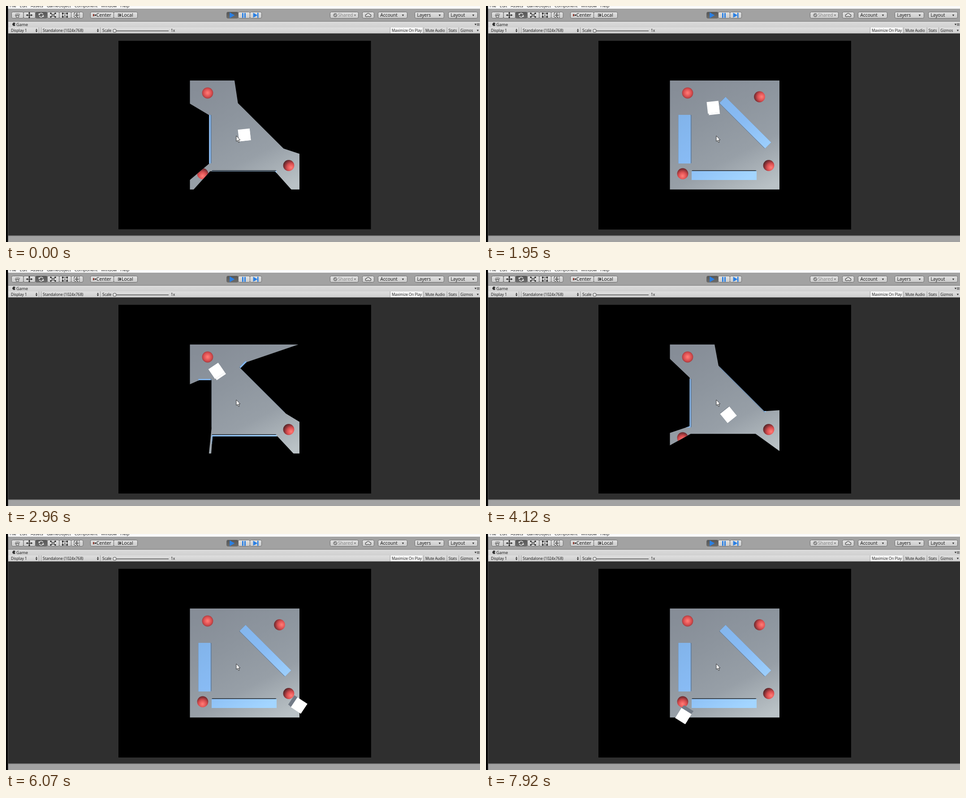
Recreate the animation shown at these times as an HTML page with a canvas. Size 1058x529 px, loop 7.99 s.

```html
<!DOCTYPE html>
<html lang="en">
<head>
<meta charset="utf-8">
<title>Line of sight</title>
<style>
html, body { margin: 0; width: 100%; height: 100%; overflow: hidden; background: #000; }
canvas { display: block; }
</style>
</head>
<body>
<canvas id="stage" width="1058" height="529"></canvas>
<script>
const ctx = document.getElementById('stage').getContext('2d');
const LOOP = 7990, STEP = 78, PUSH = 3.5;
const CENTER = { x: 533, y: 289 }, AIM = { x: 514, y: 291 };

// The cube's route as waypoints [time, x, y], with rests in between
const ROUTE = [
  [230, 532, 289], [1950, 507, 227], [2960, 470, 226], [4120, 541, 324.5], [5130, 619.5, 331.5],
  [5830, 656, 361], [6370, 652, 415], [6840, 578.5, 413], [7920, 440.5, 408]
];
const RESTS = [[620, 940], [2490, 2720], [4730, 4960]];
const REVEALED = [[1600, 2450], [5500, 6690], [7700, LOOP]];

const WALLS = [box(443, 298.5, 27.5, 109, 0), box(531.5, 380, 145, 19.8, 0), box(578.8, 261.5, 144, 19, Math.PI / 4)];
const BALLS = [[450, 195], [610.5, 203.5], [631, 357.5], [439, 376]];
const edges = [...WALLS, box(CENTER.x, CENTER.y, 1800, 1800, 0)].flatMap(sides);

function box(cx, cy, w, h, angle) {
  const c = Math.cos(angle), s = Math.sin(angle);
  return [[-1, -1], [1, -1], [1, 1], [-1, 1]].map(([i, j]) => {
    const u = i * w / 2, v = j * h / 2;
    return { x: cx + u * c - v * s, y: cy + u * s + v * c };
  });
}
function sides(points) {
  return points.map((p, i) => [p, points[(i + 1) % points.length]]);
}
function toCenter(p, scale) {
  return { x: CENTER.x + (p.x - CENTER.x) * scale, y: CENTER.y + (p.y - CENTER.y) * scale };
}

function gradient(g, ...colors) {
  colors.forEach((c, i) => g.addColorStop(i / (colors.length - 1), c));
  return g;
}
function linear(x0, y0, x1, y1, ...colors) {
  return gradient(ctx.createLinearGradient(x0, y0, x1, y1), ...colors);
}
function rect(x, y, w, h, fill) {
  ctx.fillStyle = fill;
  ctx.fillRect(x, y, w, h);
}
function frameRect(x, y, w, h, color = '#222') {
  ctx.strokeStyle = color;
  ctx.lineWidth = 1;
  ctx.strokeRect(x, y, w, h);
}
function trace(points) {
  ctx.beginPath();
  points.forEach(p => ctx.lineTo(p.x, p.y));
  ctx.closePath();
}
function poly(points, fill) {
  trace(points);
  ctx.fillStyle = fill;
  ctx.fill();
}
function disc(x, y, r, fill) {
  ctx.beginPath();
  ctx.arc(x, y, r, 0, 7);
  ctx.fillStyle = fill;
  ctx.fill();
}
function line(x0, y0, x1, y1, color = '#222', width = 1.2) {
  ctx.beginPath();
  ctx.moveTo(x0, y0);
  ctx.lineTo(x1, y1);
  ctx.strokeStyle = color;
  ctx.lineWidth = width;
  ctx.stroke();
}
function arrow(x, y, angle, size, fill = '#333') {
  const at = (a, r) => ({ x: x + r * Math.cos(angle + a), y: y + r * Math.sin(angle + a) });
  poly([at(0, size), at(2.1, size), at(-2.1, size)], fill);
}
const caret = (x, y, fill) => arrow(x, y, Math.PI / 2, 2.6, fill);

function text(s, x, y, size, color = '#111') {
  ctx.font = `${size}px "Open Sans", sans-serif`;
  ctx.fillStyle = color;
  ctx.fillText(s, x, y);
  return ctx.measureText(s).width;
}
function button(x, w, dark) {
  ctx.beginPath();
  ctx.roundRect(x + .5, 13.5, w, 14, 3);
  ctx.fillStyle = dark ? linear(0, 13, 0, 28, '#555', '#6e6e6e') : linear(0, 13, 0, 28, '#e2e2e2', '#c9c9c9');
  ctx.fill();
  ctx.strokeStyle = '#6a6a6a';
  ctx.lineWidth = 1;
  ctx.stroke();
}

function handIcon(x, y) {
  for (let i = 0; i < 4; i++) line(x - 3 + i * 2.3, y + 1, x - 4 + i * 3, y - 5 + Math.abs(i - 1.5), '#555', 1);
  line(x - 3, y + 3, x - 5.5, y - .5, '#555', 1);
  frameRect(x - 3, y + 1, 6, 4, '#555');
}
function moveIcon(x, y) {
  for (let a = 0; a < 6; a += Math.PI / 2) {
    const dx = Math.cos(a), dy = Math.sin(a);
    line(x, y, x + dx * 5, y + dy * 5, '#222', 1.5);
    arrow(x + dx * 5, y + dy * 5, a, 2.6, '#222');
  }
}
function rotateIcon(x, y) {
  for (const a of [.4, .4 + Math.PI]) {
    ctx.beginPath();
    ctx.arc(x, y, 4.5, a, a + 2.3);
    ctx.strokeStyle = '#eee';
    ctx.lineWidth = 1.5;
    ctx.stroke();
    arrow(x + 4.8 * Math.cos(a), y + 4.8 * Math.sin(a), a - 1.6, 2.6, '#eee');
  }
}
function cornersIcon(x, y) {
  for (const i of [-1, 1]) for (const j of [-1, 1]) rect(x + i * 5 - 1.5, y + j * 4 - 1.5, 3, 3, '#222');
}
function scaleIcon(x, y) {
  line(x - 5, y - 4, x + 5, y + 4);
  line(x + 5, y - 4, x - 5, y + 4);
  cornersIcon(x, y);
  rect(x - 2, y - 2, 4, 4, '#ddd');
  frameRect(x - 2, y - 2, 4, 4);
}
function rectIcon(x, y) {
  frameRect(x - 5, y - 4, 10, 8);
  cornersIcon(x, y);
  disc(x, y, 1.2, '#222');
}
function transformIcon(x, y) {
  ctx.setLineDash([3, 2]);
  frameRect(x - 6, y - 5, 12, 10);
  ctx.setLineDash([]);
  ctx.save();
  ctx.translate(x, y);
  ctx.scale(.6, .6);
  moveIcon(0, 0);
  ctx.restore();
}

function drawToolbar() {
  [handIcon, moveIcon, rotateIcon, scaleIcon, rectIcon, transformIcon].forEach((icon, i) => {
    button(12 + i * 26.6, 26.6, icon === rotateIcon);
    icon(25.5 + i * 26.5, 20.5);
  });

  button(188, 52);
  button(240, 53);
  rect(194, 18, 3, 5, '#913f35');
  rect(198, 19, 3, 3, '#333');
  text('Center', 201.5, 24.3, 10.7);
  frameRect(250.5, 17.5, 5, 6, '#444');
  rect(252, 19, 5, 3, '#444');
  text('Local', 258, 24.3, 10.7);

  const blue = '#2a7fe2';
  for (let i = 0; i < 3; i++) button(492 + i * 26, 26, i === 0);
  arrow(503, 20.7, 0, 7.5, blue);
  rect(527, 15.5, 3, 11, blue);
  rect(532, 15.5, 3, 11, blue);
  arrow(555, 20.7, 0, 6.5, blue);
  rect(561, 15, 2.5, 11.5, blue);

  button(723, 63);
  disc(735, 20.5, 4.5, '#858585');
  line(733, 20.5, 734.5, 22, '#ddd');
  line(734.5, 22, 737.5, 18.5, '#ddd');
  text('Shared', 741, 24, 10.2, '#858585');
  caret(779, 20.5, '#777');

  button(795, 26);
  for (const [grow, fill] of [[1, '#333'], [0, '#d8d8d8']]) {
    for (const i of [-1, 0, 1]) disc(808.5 + i * 3.5, 21.5 - (i ? 0 : 1.5), 2.2 + (i ? 0 : 1) + grow, fill);
  }
  for (const [label, x] of [['Account', 830], ['Layers', 912], ['Layout', 987]]) {
    button(x, 65);
    text(label, x + 5.5, 24.3, 10.2);
    caret(x + 56, 20.5);
  }
}

function drawTabs() {
  rect(5, 34, 1053, 14, linear(0, 34, 0, 48, '#dcdcdc', '#d0d0d0'));
  rect(5, 34, 1053, 1, '#777');
  ctx.beginPath();
  ctx.moveTo(19, 41);
  ctx.arc(18, 41, 3.7, .6, 5.7);
  ctx.fillStyle = '#333';
  ctx.fill();
  text('Game', 23, 44.6, 9.4);
  caret(1048, 41);
  for (let y = 39.5; y < 45; y += 2) line(1051, y, 1057, y, '#444', 1);

  rect(5, 48, 1053, 14, linear(0, 48, 0, 62, '#dedede', '#cecece'));
  const label = (s, x) => text(s, x, 57.8, 8.5);
  label('Display 1', 11);
  label('Standalone (1024x768)', 82);
  label('Scale', 215);
  label('1x', 368);
  for (const x of [68, 205]) {
    caret(x, 56.3);
    arrow(x, 53, -Math.PI / 2, 2.2);
    rect(x + 5, 48, 1, 13, '#999');
  }
  rect(78, 48, 1, 13, '#999');
  rect(243, 55, 120, 1.5, '#555');
  disc(242.5, 55.5, 4, '#555');
  disc(242.5, 55.5, 3, '#e6e6e6');

  rect(857, 48, 72, 13, '#f7f7f7');
  let x = 857;
  for (const s of ['Maximize On Play', 'Mute Audio', 'Stats', 'Gizmos']) {
    rect(x, 48, 1, 13, '#999');
    x += text(s, x + 4, 57.8, 8.1) + 8;
  }
  caret(1053, 54.5);
}

function drawEditor() {
  rect(0, 0, 1058, 529, '#a2a2a2');
  rect(0, 0, 1058, 6, '#fafafa');
  let x = 8;
  for (const s of ['File', 'Edit', 'Assets', 'GameObject', 'Component', 'Window', 'Help']) x += text(s, x, 3, 9.3) + 8;
  drawToolbar();
  drawTabs();
  rect(5, 61, 1053, 1, '#777');
  rect(5, 62, 1053, 452, '#2f2f2f');
  rect(5, 514, 1053, 1.5, '#666');
  rect(0, 0, 4.5, 529, '#000');
}

// Time spent moving up to t, leaving out the rests
function movingTime(t) {
  return RESTS.reduce((sum, [from, to]) => sum - Math.max(0, Math.min(t, to) - from), t);
}

function cubePosition(t) {
  const next = ROUTE.findIndex(k => t < k[0]);
  if (next < 1) {
    const [, x, y] = ROUTE.at(next);
    return { x, y };
  }
  const [t0, x0, y0] = ROUTE[next - 1], [t1, x1, y1] = ROUTE[next];
  const stepped = t0 + Math.floor((t - t0) / STEP) * STEP;
  const k = (movingTime(stepped) - movingTime(t0)) / (movingTime(t1) - movingTime(t0));
  return { x: x0 + (x1 - x0) * k, y: y0 + (y1 - y0) * k };
}

function castRay(from, angle) {
  const dx = Math.cos(angle), dy = Math.sin(angle);
  let best = 3000;
  for (const [a, b] of edges) {
    const ex = b.x - a.x, ey = b.y - a.y, ax = a.x - from.x, ay = a.y - from.y;
    const det = dx * ey - dy * ex;
    const dist = (ax * ey - ay * ex) / det, along = (ax * dy - ay * dx) / det;
    if (dist > 0 && along >= 0 && along <= 1) best = Math.min(best, dist);
  }
  return { x: from.x + dx * best, y: from.y + dy * best };
}

// The visible area is pushed a little along the facing direction
function visibleArea(pos, facing) {
  return edges
    .flatMap(([p]) => [-1e-4, 0, 1e-4].map(e => Math.atan2(p.y - pos.y, p.x - pos.x) + e))
    .sort((a, b) => a - b)
    .map(angle => castRay(pos, angle))
    .map(p => ({ x: p.x + PUSH * Math.cos(facing), y: p.y + PUSH * Math.sin(facing) }));
}

// A block seen from above: its sides lean towards the centre of the view
function drawBlock(top, fill, scale, litSide, darkSide) {
  for (const [p, q] of sides(top)) {
    const lit = q.y - p.y + p.x - q.x > -1;
    poly([p, q, toCenter(q, scale), toCenter(p, scale)], lit ? litSide : darkSide);
  }
  poly(top, fill);
}

function drawBoard() {
  rect(410.5, 167, 244.5, 244.3, linear(470, 160, 605, 420, '#868d97', '#8d959e', '#979fa7', '#bac2c6'));
  const blue = linear(440, 215, 570, 395, '#80b2e8', '#88bbf4', '#a3d5ff');
  for (const wall of WALLS) drawBlock(wall, blue, .975, '#5f7d9f', '#3c454e');
  for (const [x, y] of BALLS) {
    const glow = toCenter({ x, y }, 1.03);
    glow.x += 2.5;
    glow.y += 2.5;
    const shade = ctx.createRadialGradient(glow.x, glow.y, 0, glow.x, glow.y, 19);
    disc(x, y, 12.4, gradient(shade, '#ff8078', '#f06362', '#d24b4d', '#8e3438', '#562629'));
  }
}

function drawCursor() {
  ctx.save();
  ctx.translate(AIM.x, AIM.y);
  const arrowPath = new Path2D('M0 0V12.5L2.8 10 5 15 7 14.2 4.9 9.4 8.7 9.2Z');
  ctx.fillStyle = '#fff';
  ctx.fill(arrowPath);
  ctx.strokeStyle = '#222';
  ctx.lineWidth = .9;
  ctx.stroke(arrowPath);
  ctx.restore();
}

function frame(now) {
  const t = now % LOOP;
  const pos = cubePosition(t);
  const facing = Math.atan2(AIM.y - pos.y, AIM.x - pos.x);
  rect(251, 78, 563.5, 422.5, '#000');
  ctx.save();
  if (!REVEALED.some(([from, to]) => t >= from && t < to)) {
    trace(visibleArea(pos, facing));
    ctx.clip();
  }
  drawBoard();
  ctx.restore();
  drawBlock(box(pos.x, pos.y, 26.4, 26.4, facing), '#fff', .94, '#fff', '#727b87');
  drawCursor();
  requestAnimationFrame(frame);
}

drawEditor();
requestAnimationFrame(frame);
</script>
</body>
</html>
```
